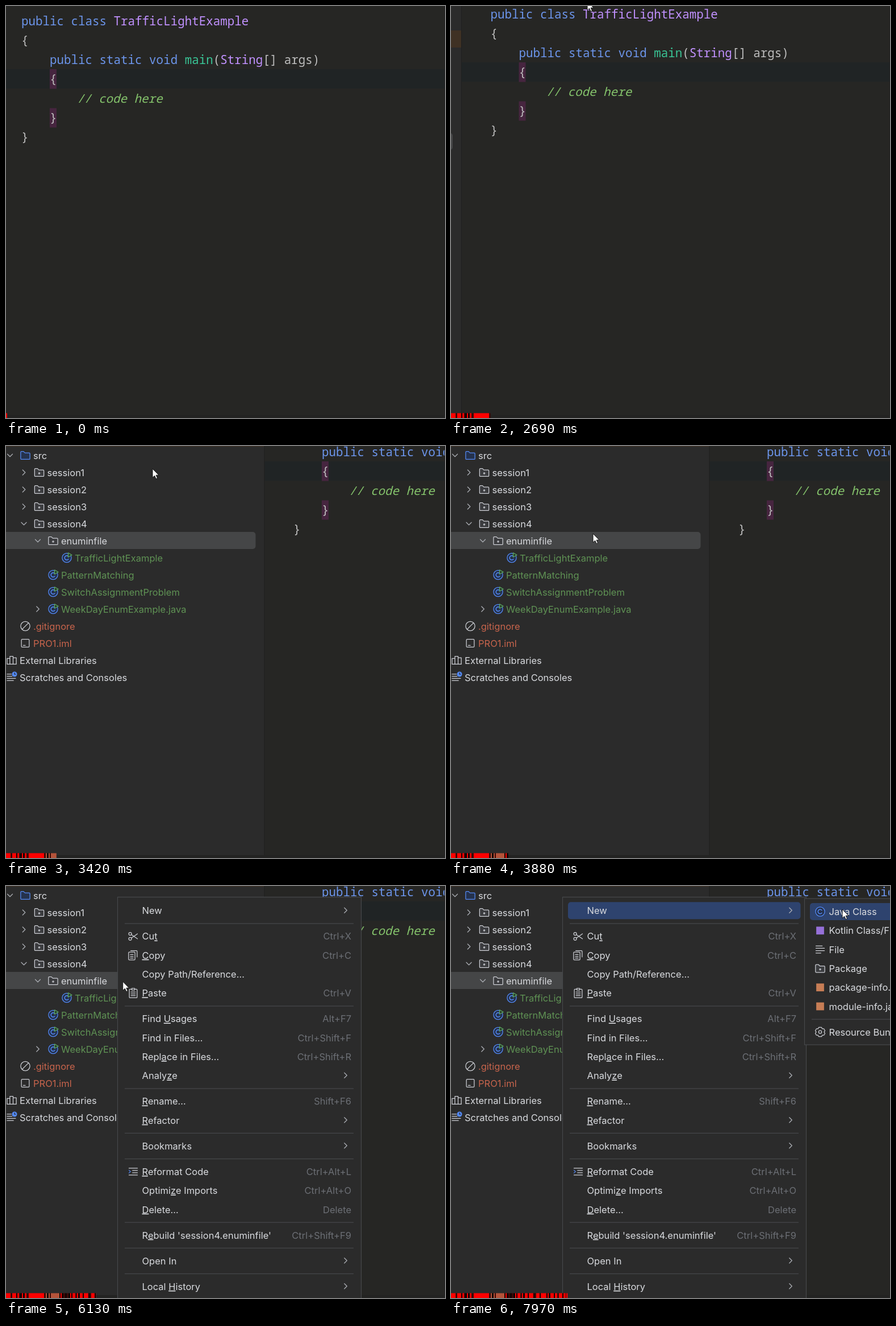
Write an HTML page that moves like this. It is 773x724 px and loops after 8 s.

```html
<!DOCTYPE html>
<html lang="en">
<head>
<meta charset="utf-8">
<title>IDE screen recording</title>
<style>
  html, body { margin: 0; width: 100%; height: 100%; overflow: hidden; background: #262624; }
  svg { display: block; width: 773px; height: 724px; }
  text { font: 16.5px Inter, "Noto Sans", sans-serif; font-optical-sizing: none; fill: #d8dade; white-space: pre; }
  .code { font: 20.85px "Noto Sans Mono", "DejaVu Sans Mono", monospace; fill: #bdbdbd; }
  .kw { fill: #6c95eb; } .type { fill: #c191ff; } .fn { fill: #39c596; }
  .note { fill: #85c46c; font-style: italic; }
  .green { fill: #5f9254; } .red { fill: #c7644c; }
  .key { fill: #6c6f75; text-anchor: end; }
  .on { fill: #d8dade; }
  .u { text-decoration: underline; }
  .line { fill: none; stroke: #ced0d6; stroke-width: 1; stroke-linecap: round; stroke-linejoin: round; }
</style>
</head>
<body>
<svg id="stage" viewBox="0 0 773 724"></svg>
<script>
const FRAME = 68.1, LOOP = 8000;
const BLUE = '#2e436e', GRAY = '#454647', PANEL = '#2b2b2b', EDGE = '#46484b';

const rect = (x, y, w, h, fill, more = '') =>
  `<rect x="${x}" y="${y}" width="${w}" height="${h}" fill="${fill}" ${more}/>`;
const text = (x, y, str, cls = '', more = '') =>
  `<text x="${x}" y="${y}" class="${cls}" ${more}>${str}</text>`;
const mnemonic = s => s.replace(/_(.)/, '<tspan class="u">$1</tspan>');
const path = (d, more = '') => `<path class="line" d="${d}" ${more}/>`;

// Icons live in a 16-unit box centred on the origin.
const folder = (style, dot) =>
  path('M-6.5-4.5a1 1 0 0 1 1-1h3l2 2h6a1 1 0 0 1 1 1v7a1 1 0 0 1-1 1h-11a1 1 0 0 1-1-1z', `style="${style}"`) +
  (dot ? '<circle class="line" cy="1.2" r=".9"/>' : '');
const classIcon =
  '<circle r="6.5" fill="#25324d" stroke="#548af7"/>' +
  path('M2.3-1.9a3 3 0 1 0 0 3.8', 'style="stroke:#548af7;stroke-width:1.2"');
const icons = {
  src: folder('fill:#25324d;stroke:#548af7'),
  pack: folder('fill:#3b3c3f', true),
  cls: classIcon,
  run: classIcon + path('M2-7L7.2-4L2-1z', 'style="fill:#253627;stroke:#5fad65"'),
  ignore: '<circle class="line" r="6.5"/>' + path('M-4.5 4.5L4.5-4.5'),
  iml: '<rect class="line" x="-5.5" y="-5.5" width="11" height="11" rx="1.2"/>' + path('M-3 3h3'),
  libs: path('M-6.5-2.5h4v8h-4zM-2.5-5.5h4.5v11h-4.5zM2-3.5h4.5v9h-4.5z'),
  scratch: path('M-6.5-4.5h6M-6.5-1.5h7M-6.5 1.5h12M-6.5 4.5h9') +
    '<circle cx="4" cy="-4.4" r="3.6" fill="#548af7"/>' + path('M4-6.4v2h1.5', 'style="stroke:#2b2b2b"'),
  cut: '<circle class="line" cx="-4.3" cy="-3.5" r="2"/><circle class="line" cx="-4.3" cy="3.5" r="2"/>' +
    path('M-2.6-2.4L6 3.5M-2.6 2.4L6-3.5'),
  copy: path('M-3.5-6.5h8a1 1 0 0 1 1 1v8M-5.5-4.5h7a1 1 0 0 1 1 1v9a1 1 0 0 1-1 1h-7a1 1 0 0 1-1-1v-9a1 1 0 0 1 1-1zM-4-1h4M-4 1.5h4M-4 4h4'),
  paste: path('M-2-5.5h-2.5a1 1 0 0 0-1 1v10a1 1 0 0 0 1 1h9a1 1 0 0 0 1-1v-10a1 1 0 0 0-1-1h-2.5M-2-6.8h4v2.5h-4zM-3-1.5h6M-3 1h6M-3 3.5h6'),
  format: path('M-6-4.8h12M-1-1.6h7M-1 1.6h7M-6 4.8h12') +
    path('M-6-2l2.2 2l-2.2 2', 'style="stroke:#548af7"'),
  file: path('M-6-5h9M-6-1.7h12M-6 1.7h12M-6 5h7'),
  violet: rect(-5.5, -5.5, 11, 11, '#9670d8'),
  orange: rect(-5.5, -5.5, 11, 11, '#c77d55'),
  gear: path('M-2-6.5h4l1 2 2.3 0 1.5 2.6-1.2 1.9 1.2 1.9-1.5 2.6h-2.3l-1 2h-4l-1-2h-2.3l-1.5-2.6 1.2-1.9-1.2-1.9 1.5-2.6h2.3z') +
    '<circle class="line" r="2.1"/>'
};
const icon = (name, x, y) => `<g transform="translate(${x} ${y}) scale(1.25)">${icons[name]}</g>`;
const chevron = (x, y, open) =>
  path(open ? `M${x - 4.5} ${y - 2.2}l4.5 4.5l4.5-4.5` : `M${x - 2.2} ${y - 4.5}l4.5 4.5l-4.5 4.5`,
    'style="stroke:#a9acb2;stroke-width:1.3"');

// Editor
const codeLines = [
  '<tspan class="kw">public class</tspan> <tspan class="type">TrafficLightExample</tspan>',
  '{',
  '    <tspan class="kw">public static void</tspan> <tspan class="fn">main</tspan>(<tspan class="type">String</tspan>[] args)',
  '    {',
  '        <tspan class="note" dx="-1.5">// code here</tspan>',
  '    }',
  '}'
];
const editor = rect(455, 27, 1000, 34, '#202425') +
  rect(556, 27, 12, 34.5, '#46253f') + rect(556, 95.5, 12, 34, '#46253f') +
  codeLines.map((s, i) => text(506, -50.2 + 34.1 * i, s, 'code')).join('');

// Project tree: label, text x, icon, chevron (1 closed, 2 open), colour
const treeRows = [
  ['src', 48, 'src', 2], ['session1', 72.5, 'pack', 1], ['session2', 72.5, 'pack', 1],
  ['session3', 72.5, 'pack', 1], ['session4', 72.5, 'pack', 2], ['enuminfile', 97, 'pack', 2],
  ['TrafficLightExample', 121, 'run', 0, 'green'], ['PatternMatching', 97, 'run', 0, 'green'],
  ['SwitchAssignmentProblem', 97, 'run', 0, 'green'], ['WeekDayEnumExample.java', 97, 'run', 1, 'green'],
  ['.gitignore', 48, 'ignore', 0, 'red'], ['PRO1.iml', 48, 'iml', 0, 'red'],
  ['External Libraries', 24, 'libs', 0], ['Scratches and Consoles', 24, 'scratch', 0]
];
const tree = rect(-60, -200, 515, 1200, PANEL) + rect(-60, -29, 515, 30, '#3f3124') +
  rect(454.5, -200, 1, 1200, '#1e1f1f') +
  rect(-60, 151, 499.5, 30, GRAY, 'id="picked" rx="5"') +
  treeRows.map(([label, x, ic, fold, cls], i) => {
    const y = 16.5 + 30 * i;
    return (fold ? chevron(x - 41, y, fold === 2) : '') + icon(ic, x - 14, y) +
      text(x, y + 6, label, cls, `id="row${i}"`);
  }).join('');

// Menus: label, shortcut ('>' opens a submenu), icon; null is a separator
const menuItems = [
  ['New', '>'], null,
  ['Cu_t', 'Ctrl+X', 'cut'], ['_Copy', 'Ctrl+C', 'copy'], ['Copy Path/Reference...', ''],
  ['_Paste', 'Ctrl+V', 'paste'], null,
  ['Find _Usages', 'Alt+F7'], ['Find in Files...', 'Ctrl+Shift+F'],
  ['Repl_ace in Files...', 'Ctrl+Shift+R'], ['Analy_ze', '>'], null,
  ['_Rename...', 'Shift+F6'], ['_Refactor', '>'], null, ['Bookmarks', '>'], null,
  ['_Reformat Code', 'Ctrl+Alt+L', 'format'], ['Optimi_ze Imports', 'Ctrl+Alt+O'],
  ['_Delete...', 'Delete'], null, ["R_ebuild 'session4.enuminfile'", 'Ctrl+Shift+F9'], null,
  ['Open In', '>'], null, ['Local _History', '>']
];
const subItems = [
  ['Java Class', '', 'cls'], ['Kotlin Class/File', '', 'violet'], ['File', '', 'file'],
  ['Package', '', 'pack'], ['package-info.java', '', 'orange'], ['module-info.java', '', 'orange'],
  null, ['Resource Bundle', '', 'gear']
];
function buildMenu(items, x, y) {
  const centres = [];
  let out = '';
  for (const item of items) {
    if (!item) {
      out += rect(x + 13, y - 11.2, 403, 1.2, EDGE);
      y += 11.8;
      continue;
    }
    const [label, key, ic] = item;
    centres.push(y);
    if (ic) out += icon(ic, x + 28, y);
    out += text(x + 43.5, y + 6, mnemonic(label));
    if (key === '>') out += chevron(x + 402, y - .5);
    else out += text(x + 412, y + 6, key, 'key');
    y += 33.3;
  }
  return { out, centres };
}
const menu = buildMenu(menuItems, 196, 43.3);
const sub = buildMenu(subItems, 622, 45);
const frameBox = (x, y, h) => rect(x + .5, y + .5, 429, h, PANEL, `stroke="${EDGE}" stroke-width="1.2"`);

// Bottom strip: x where each colour begins
const R = '#fe0000', D = '#3a0806', K = '#120303', B = '#b4533a';
const strip = [
  [0, R], [8, D], [11, R], [18, K], [20, R], [23, D], [25, K], [28, R], [30, K], [33, R], [36, D],
  [40, R], [67, D], [70, B], [72, K], [75, B], [77, D], [79, B], [94, K], [96, R], [98, K], [101, D],
  [104, K], [107, D], [110, K], [113, R], [115, K], [117, R], [122, D], [125, R], [127, K], [130, R],
  [135, K], [137, R], [145, K], [147, D], [150, R], [156, K], [158, R], [168, K], [170, R], [172, K],
  [175, R], [181, K], [183, R], [187, D], [190, R], [196, K], [198, R], [202, K], [203, R]
];
const stripRects = strip.map(([x, c], i) =>
  rect(x, 715.5, (strip[i + 1]?.[0] ?? 210) - x, 8.5, c)).join('');

document.getElementById('stage').innerHTML =
  rect(0, 0, 773, 724, '#262624') +
  `<g id="world">${editor}${tree}</g>` +
  rect(772, 0, 1, 724, '#1e1f1f') +
  rect(769, 0, 4, 724, '#f4f4f4', 'id="flash"') +
  rect(0, 719, 773, 5, '#232322') +
  `<g id="menu">${frameBox(196, 19, 800)}${rect(206, 0, 409.5, 30, BLUE, 'id="hover" rx="5"')}${menu.out}</g>` +
  `<g id="sub">${frameBox(622, 21.5, 257)}${rect(632, 30, 409, 30, BLUE, 'id="subHover" rx="5"')}${sub.out}</g>` +
  `<clipPath id="clip">${rect(0, 715, 0, 9, '#000', 'id="clipBox"')}</clipPath>` +
  `<g clip-path="url(#clip)">${stripRects}</g>` +
  '<path id="beam" d="M-3-8q3 0 3 2v12q0 2-3 2M3-8q-3 0-3 2v12q0 2 3 2" fill="none" stroke="#d0d0d0" stroke-width="1.2"/>' +
  '<path id="arrow" d="M0 0V15.5L3.7 12.2L6.1 17.6L8.6 16.5L6.2 11.2H11z" fill="#fff" stroke="#111" stroke-width="1"/>';

const el = id => document.getElementById(id);
const show = (id, on) => el(id).style.display = on ? '' : 'none';
const place = (id, [x, y]) => el(id).setAttribute('transform', `translate(${x} ${y})`);
const smooth = k => k * k * (3 - 2 * k);

// Keys are [step, x, y]
function along(keys, step, ease = k => k) {
  const i = keys.findIndex(k => k[0] > step);
  if (i < 0) return keys.at(-1).slice(1);
  if (i === 0) return keys[0].slice(1);
  const a = keys[i - 1], b = keys[i];
  const k = ease((step - a[0]) / (b[0] - a[0]));
  return [a[1] + (b[1] - a[1]) * k, a[2] + (b[2] - a[2]) * k];
}
const pan = [[37, -479, 84], [38, -465, 79], [39, -436.5, 72], [46, -81, 11.5],
  [47, -40, 6], [48, -17, 2.5], [50, 0, 0]];
const beamKeys = [[1, 700, 290], [13, 302, 82], [21, 245, -12]];
const arrowKeys = [[38, 238, -18], [39, 240, -8], [46, 262, -13], [50, 258, 40], [55, 250, 154],
  [59, 250, 154], [69, 220, 186], [76, 220, 186], [85, 196, 170], [88, 196, 170], [95, 245, 160],
  [99, 248, 163], [104, 262, 45], [106, 280, 42], [110, 640, 44], [117, 689, 41]];

function draw(ms) {
  const step = Math.min(117, Math.floor((ms + 20) / FRAME));
  place('world', along(pan, step));
  show('flash', step >= 45 && step <= 47);
  el('clipBox').setAttribute('width', 2 + step * FRAME * .0255);

  show('beam', step >= 1 && step <= 21);
  place('beam', along(beamKeys, step, smooth));
  const tip = along(arrowKeys, step, smooth);
  show('arrow', step >= 38);
  place('arrow', tip);

  const onFile = step >= 70 && step < 85;
  const picked = el('picked');
  picked.setAttribute('y', onFile ? 181 : 151);
  picked.setAttribute('fill', step >= 70 && step < 87 ? BLUE : GRAY);
  el('row6').setAttribute('class', onFile ? 'on' : 'green');

  const subOpen = step >= 106;
  show('menu', step >= 87);
  show('sub', subOpen);
  const hovered = subOpen ? menu.centres[0]
    : tip[0] > 206 && menu.centres.find(y => Math.abs(y - tip[1]) < 16.6);
  show('hover', hovered);
  if (hovered) el('hover').setAttribute('y', hovered - 15);
  show('subHover', tip[0] > 622);
}

function tick(now) {
  draw(now % LOOP);
  requestAnimationFrame(tick);
}
draw(0);
requestAnimationFrame(tick);
</script>
</body>
</html>
```
